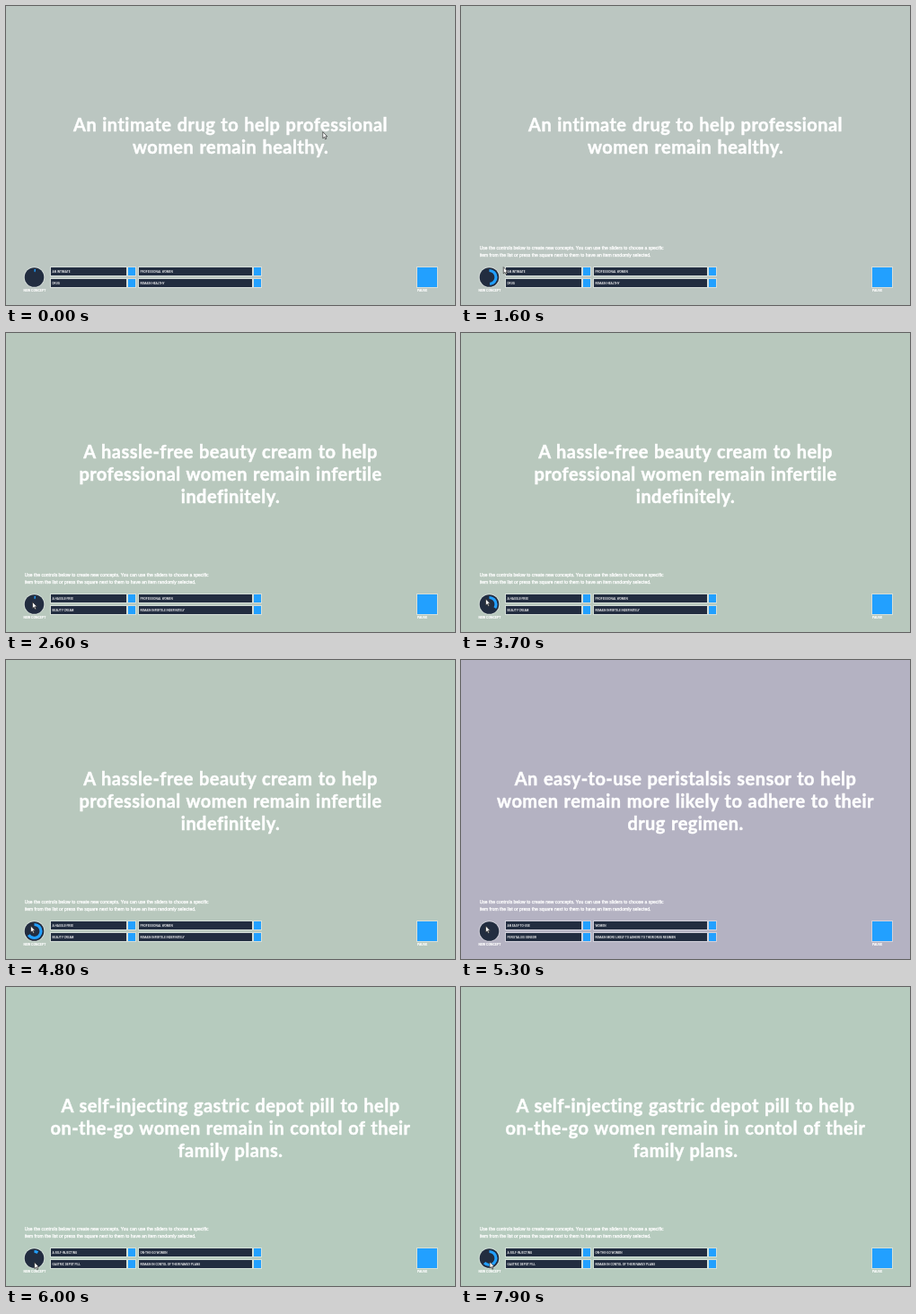
Animation of 500x334 px, one loop 8000 ms. Source, as an HTML page:

```html
<!DOCTYPE html>
<html lang="en">
<head>
<meta charset="utf-8">
<title>Concept generator</title>
<style>
  html, body { margin: 0; width: 100%; height: 100%; overflow: hidden; }
  svg { display: block; width: 100vw; height: 100vh; }
  text { fill: #fff; }
  #headline { font: 700 20px Lato, sans-serif; letter-spacing: .45px; word-spacing: .9px; text-anchor: middle;
    stroke: #fff; stroke-width: .45px; }
  #help { font: 5.06px "Liberation Sans", Arial, sans-serif; stroke: #fff; stroke-width: .25px; }
  .label { font: 700 3.3px "Liberation Sans", Arial, sans-serif; stroke: #fff; stroke-width: .15px; }
  .value { font: 500 3.25px Roboto, sans-serif; }
  .dark, .blue { stroke: #fff; stroke-opacity: .4; stroke-width: 2px; paint-order: stroke; }
  .dark { fill: #222d40; }
  .blue { fill: #22a0ff; }
</style>
</head>
<body>
<svg viewBox="0 0 500 334">
  <rect id="back" width="500" height="334"/>
  <g id="headline">
    <text x="250" y="140.4"></text>
    <text x="250" y="165.4"></text>
    <text x="250" y="190.4"></text>
  </g>
  <g id="help">
    <text x="20.7" y="272.4">Use the controls below to create new concepts. You can use the sliders to choose a specific</text>
    <text x="20.7" y="280.4">item from the list or press the square next to them to have an item randomly selected.</text>
  </g>
  <g id="sliders"></g>
  <circle class="dark" cx="31.5" cy="303" r="10.8"/>
  <circle id="arc" cx="31.5" cy="303" r="7.5" pathLength="100" transform="rotate(-90 31.5 303)"
    fill="none" stroke="#22a0ff" stroke-width="3.2"/>
  <text class="label" x="19.5" y="318.6">NEW CONCEPT</text>
  <rect class="blue" x="458" y="292" width="22" height="22"/>
  <text class="label" x="458" y="318.6">PAUSE</text>
  <path id="cursor" d="M0 0V7.2L1.7 5.7 2.8 8.2 4 7.7 2.9 5.2H5Z" fill="#fff" stroke="#2a2a2a" stroke-width=".7"/>
</svg>
<script>
const LOOP = 8000, DIAL_PERIOD = 3500;

// "|" marks a line break in the headline
const concepts = [
  { start: -100, color: '#bbc6c1', parts: ['An intimate', 'drug', 'professional|women', 'remain healthy'] },
  { start: 2400, color: '#c5b4cf', parts: ['A familiar', 'jelly-based bio-degradable', '|sexually active women',
    'remain more likely to|adhere to their drug regimen'] },
  { start: 2500, color: '#b8c8bd', parts: ['A hassle-free', 'beauty cream', '|professional women',
    'remain infertile|indefinitely'] },
  { start: 5300, color: '#b4b2c2', parts: ['An easy-to-use', 'peristalsis sensor', '|women',
    'remain more likely to adhere to their|drug regimen'] },
  { start: 5700, color: '#b6cbbe', parts: ['A self-injecting', 'gastric depot pill', '|on-the-go women',
    'remain in contol of their|family plans'] },
];

// time, x, y of the pointer tip
const route = [
  [0, 353, 140.5], [900, 173, 229], [1700, 29.5, 300.5], [2700, 29.5, 300.5],
  [3500, 27.5, 297], [5300, 27.5, 297], [5900, 31.7, 307.5], [7900, 32, 307],
];

const $ = id => document.getElementById(id);
const lines = [...$('headline').children];

$('sliders').innerHTML = [[50, 292, 84], [50, 305, 84], [148, 292, 126], [148, 305, 126]].map(([x, y, w]) =>
  `<rect class="dark" x="${x}" y="${y}" width="${w}" height="9"/>
   <rect class="blue" x="${x + w + 2}" y="${y}" width="8" height="9"/>
   <text class="value" x="${x + 1.5}" y="${y + 5.8}"></text>`).join('');
const values = [...document.querySelectorAll('.value')];

function pointerAt(t) {
  const next = route.findIndex(p => p[0] > t);
  const end = next < 0 ? route.length - 1 : next;
  const [t0, x0, y0] = route[end - 1], [t1, x1, y1] = route[end];
  const k = Math.min(1, (t - t0) / (t1 - t0));
  return [x0 + (x1 - x0) * k, y0 + (y1 - y0) * k];
}

let shown;
function showConcept(concept) {
  if (concept === shown) return;
  shown = concept;
  const [kind, item, who, goal] = concept.parts;
  const rows = `${kind} ${item} to help ${who} ${goal}.`.split(/ *\| */);
  lines.forEach((line, i) => line.textContent = rows[i] || '');
  values.forEach((value, i) => value.textContent = concept.parts[i].replace('|', ' ').trim().toUpperCase());
  $('back').setAttribute('fill', concept.color);
}

function draw(now) {
  const t = now % LOOP;
  const concept = concepts.findLast(c => c.start <= t);
  showConcept(concept);
  const [x, y] = pointerAt(t);
  $('cursor').setAttribute('transform', `translate(${x} ${y})`);
  $('help').setAttribute('visibility', y > 264 ? 'visible' : 'hidden');
  const turn = Math.min(1, (t - concept.start) / DIAL_PERIOD) * 100;
  $('arc').setAttribute('stroke-dasharray', `${turn} 100`);
}

const origin = performance.now();
function tick() {
  draw(performance.now() - origin);
  requestAnimationFrame(tick);
}
tick();
</script>
</body>
</html>
```
